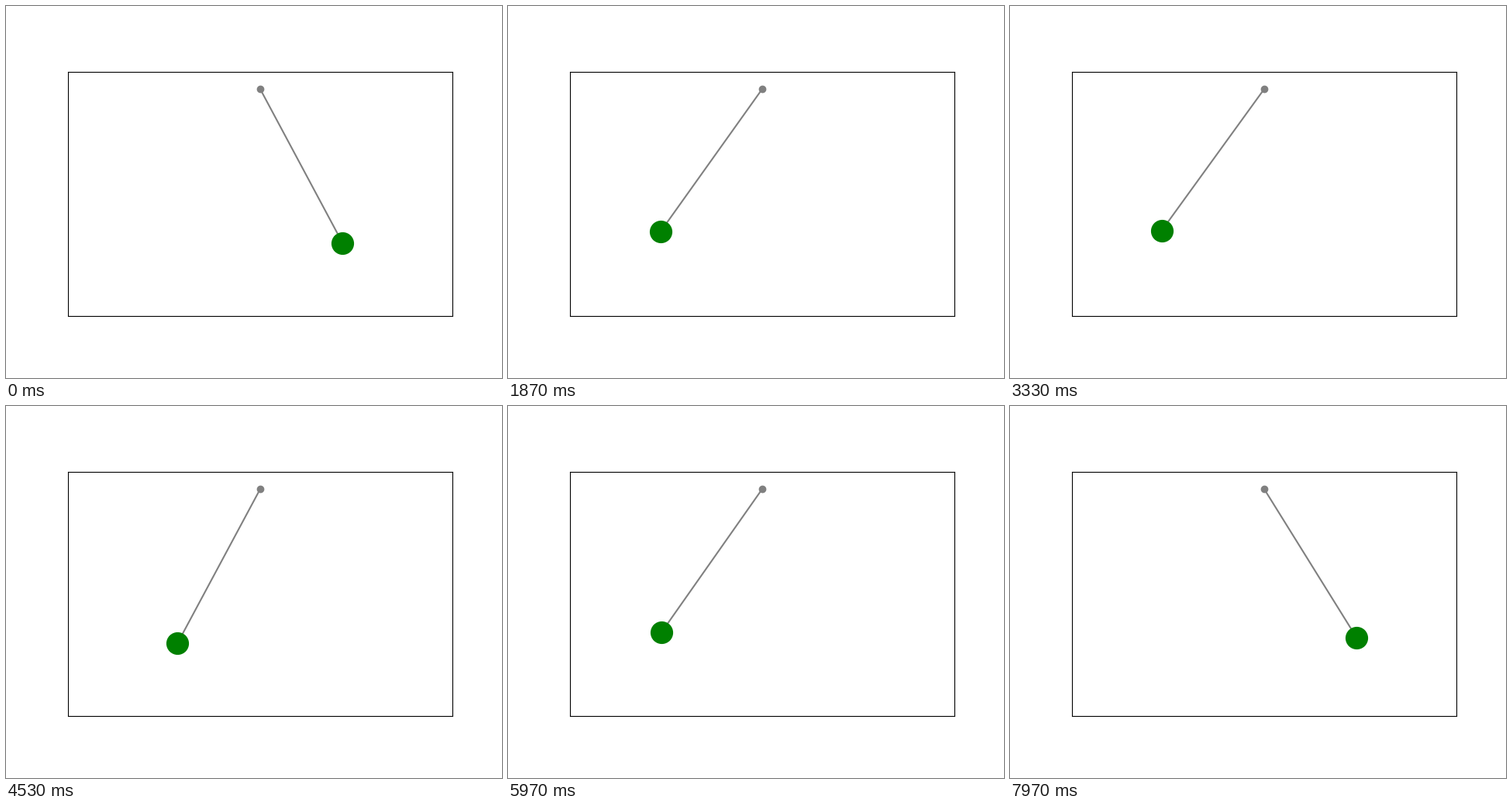
A matplotlib script for the animation above (8 s loop, 640 by 480 pixels).

```python
import numpy as np
import matplotlib.pyplot as plt
from matplotlib.animation import FuncAnimation

FPS = 30
FRAMES = 240
LENGTH = 1.0
AMPLITUDE = np.radians(36.1)
PHASE = np.radians(39.0)      # phase at the start of the loop
STEP = np.radians(8.7565)     # phase advance per frame


def angle(frame):
    """Pendulum swing: a cosine plus its third harmonic."""
    phi = PHASE + STEP * frame
    eps = AMPLITUDE**2 / 192
    return AMPLITUDE * ((1 + eps) * np.cos(phi) - eps * np.cos(3 * phi))


fig, ax = plt.subplots(figsize=(6.4, 4.8), dpi=100)
ax.set_aspect("equal")
ax.set_xlim(-1.1 * LENGTH, 1.1 * LENGTH)
ax.set_ylim(-1.3 * LENGTH, 0.1 * LENGTH)
ax.set_xticks([])
ax.set_yticks([])

rod, = ax.plot([], [], "o-", color="gray", lw=1.5, markersize=6)
bob, = ax.plot([], [], "o", color="green", markersize=20)


def update(frame):
    theta = angle(frame)
    x, y = LENGTH * np.sin(theta), -LENGTH * np.cos(theta)
    rod.set_data([0, x], [0, y])
    bob.set_data([x], [y])
    return rod, bob


anim = FuncAnimation(fig, update, frames=FRAMES, interval=1000 / FPS,
                     repeat=True, repeat_delay=0)
plt.show()
```
